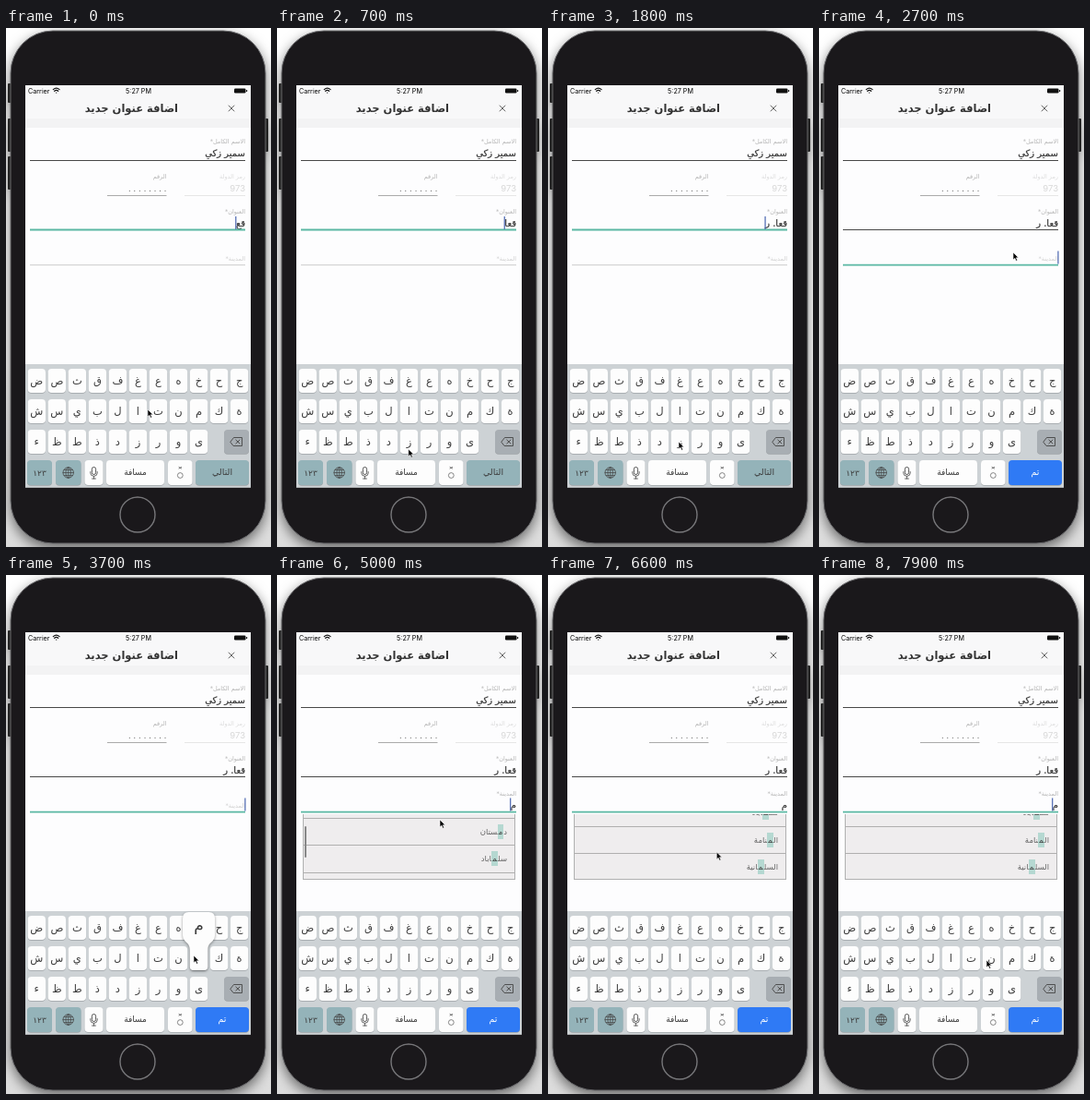
These frames come from a looping animation (288 by 562 pixels, 8000 ms). An HTML page:

```html
<!DOCTYPE html>
<html lang="ar">
<head>
<meta charset="utf-8">
<style>
html, body { margin: 0; width: 288px; height: 562px; overflow: hidden; background: linear-gradient(#fff 0 65%, #dcdcdc); }
svg, #list { position: absolute; }
svg { left: 0; top: 0; }
text, #list { font-family: "DejaVu Sans", sans-serif; }
text { white-space: pre; }
.latin { font-family: Inter, sans-serif; }
.value { font-size: 10px; fill: #333; stroke: #333; stroke-width: .2px; }
.label { font-size: 6.5px; fill: #b4b4b4; }
#list { left: 28px; top: 259px; width: 229px; height: 70px; overflow: hidden; border: 1px solid #b0b0b0; border-top: 0; background: #efedee; }
#rows { position: absolute; top: 4px; width: 100%; }
#rows div { box-sizing: border-box; height: 29.2px; padding-right: 8px; border-top: 1px solid #b0afaf; font-size: 8.5px; line-height: 28px; color: #666; direction: rtl; }
mark { background: #b5d8d1; color: #444; padding: 3px 1px; }
#bar { position: absolute; left: 1px; width: 2px; height: 34px; border-radius: 1px; background: #888; }
</style>
</head>
<body>
<svg id="phone" width="288" height="562"></svg>
<div id="list"><div id="rows"></div><div id="bar"></div></div>
<svg width="288" height="562">
  <path id="pointer" d="M0 0V8L1.9 6.3 3.2 9.2 4.6 8.6 3.3 5.8H5.8Z" fill="#000" stroke="#fff" stroke-width=".6"/>
</svg>
<script>
const $ = id => document.getElementById(id);
const rect = (x, y, w, h, r, fill, extra = '') =>
  `<rect x="${x}" y="${y}" width="${w}" height="${h}" rx="${r}" fill="${fill}" ${extra}/>`;
const line = (x1, x2, y, color, width, extra = '') =>
  `<path d="M${x1} ${y}H${x2}" stroke="${color}" stroke-width="${width}" ${extra}/>`;
const rtl = (x, y, str, extra = '') => `<text x="${x}" y="${y}" direction="rtl" ${extra}>${str}</text>`;
const mid = (x, y, size, str, extra = '') =>
  `<text x="${x}" y="${y}" font-size="${size}" text-anchor="middle" ${extra}>${str}</text>`;
const icon = (d, width = 1, color = '#444') =>
  `<path d="${d}" fill="none" stroke="${color}" stroke-width="${width}" stroke-linecap="round"/>`;
const key = (x, y, w, h = 26, fill = '#fdfdfd', id = '') =>
  rect(x, y + .8, w, h, 4, '#9da2a6') + rect(x, y, w, h, 4, fill, id && `id="${id}"`);

const TEAL = '#5ab8a3', DIM = '#94b3b9', BLUE = '#2f7af5', WHITE = '#fdfdfd', INK = '#3c3c3c', RULE = '#484848';
const LETTERS = ['ضصثقفغعهخحج', 'شسيبلاتنمكة', 'ءظطذدزروى'];
const keyX = col => 33.3 + 22.03 * col;
const keyY = row => 369 + 33 * row;

const body = `
  <g style="filter:drop-shadow(0 5px 7px #0008)">
    ${[[60, 21], [98, 36], [139, 36]].map(([y, h]) => rect(2, y, 5, h, 1, '#222')).join('')}
    ${rect(280, 98, 5, 36, 1, '#222')}
    ${rect(5, 3, 277, 555, 46, '#1a181b', 'stroke="#6a6a6d"')}
  </g>
  <circle cx="143" cy="527" r="19" fill="none" stroke="#77777a" stroke-width="1.4"/>
  ${rect(21, 62, 245, 435.5, 0, '#fdfdfe')}`;

const header = `
  ${rect(21, 62, 245, 37, 0, '#f8f8f9')}${rect(21, 98, 245, 10, 0, '#f3f3f4')}
  <text class="latin" x="24" y="70.5" font-size="7.2">Carrier</text>
  <text class="latin" x="144" y="70.5" font-size="7.2" text-anchor="middle">5:27 PM</text>
  ${icon('M51.3 66.6Q54.7 63.6 58.1 66.6M52.7 68.3Q54.7 66.6 56.7 68.3M54.7 70V70.1', 1.2, '#111')}
  ${rect(248, 65.5, 12.5, 5, 1.3, '#111')}${rect(261, 67, 1.2, 2, .5, '#111')}
  ${rtl(187, 90.5, 'اضافة عنوان جديد', 'font-size="11.5" font-weight="700" fill="#333"')}
  ${icon('M242 84L248 90M248 84L242 90', .8)}`;

const form = `
  ${rtl(260, 124.5, 'الاسم الكامل*', 'class="label"')}
  ${rtl(260, 139, 'سمير زكي', 'class="value"')}
  ${line(26, 260, 143.5, RULE, 1)}
  ${rtl(260, 162.5, 'رمز الدولة', 'class="label" style="fill:#dcdcdc"')}
  ${rtl(174.5, 162.5, 'الرقم', 'class="label"')}
  <text class="latin" x="260" y="177" font-size="9.5" fill="#d8d8d8" text-anchor="end">973</text>
  <text x="133" y="176.5" font-size="8" letter-spacing="3" fill="#555">........</text>
  ${line(194, 260, 181.5, '#e6e6e6', 1)}${line(110, 174.5, 181.5, '#aaa', 1)}
  ${rtl(260, 200.5, 'العنوان*', 'class="label"')}
  ${rtl(260, 214.5, '', 'class="value" id="address"')}
  ${line(26, 260, 218.5, RULE, 1, 'id="addressLine"')}
  ${rtl(260, 251.5, 'المدينة*', 'class="label" id="cityLabel"')}
  ${rtl(260, 252.5, '', 'class="value" id="city"')}
  ${line(26, 260, 256.7, '#ccc', 1, 'id="cityLine"')}
  ${rect(0, 0, 1.2, 14, 0, '#4a66b0', 'id="caret"')}`;

const letterKeys = LETTERS.map((row, r) => [...row].map((ch, c) =>
  key(keyX(c) - 9.7, keyY(r), 19.4) + mid(keyX(c), keyY(r) + 16.5, 11.5, ch, `fill="${INK}"`)).join('')).join('');

const keyboard = `
  ${rect(21, 364, 245, 133.5, 0, '#cdd2d5')}
  ${letterKeys}
  ${key(237, 435, 27, 26, '#a8aeb3')}
  ${icon('M244 448L247.5 443.5H256.5V452.5H247.5ZM249.8 446L254 450M254 446L249.8 450', .9)}
  ${key(23, 468, 27, 27, DIM)}${mid(36.5, 484.5, 9, '١٢٣', `fill="${INK}"`)}
  ${key(54, 468, 27.5, 27, DIM)}
  ${icon('M62 481.5H73.4M67.7 475.8V487.2M63.2 478.5H72.2M63.2 484.5H72.2', .7)}
  <g fill="none" stroke="#444" stroke-width=".8"><circle cx="67.7" cy="481.5" r="5.7"/><ellipse cx="67.7" cy="481.5" rx="2.7" ry="5.7"/></g>
  ${key(85.5, 468, 20, 27)}
  ${rect(93.4, 475.5, 4.2, 8, 2.1, 'none', 'stroke="#444" stroke-width=".9"')}
  ${icon('M91.8 480.5V482Q92 485.3 95.5 485.3T99.2 482V480.5M95.5 485.5V488M93.5 488H97.5', .8)}
  ${key(109, 468, 63, 27, WHITE, 'space')}${mid(140.5, 484, 9, 'مسافة', `fill="${INK}"`)}
  ${key(176, 468, 26.5, 27)}
  <circle cx="189.3" cy="484.5" r="2.9" fill="none" stroke="#555" stroke-width=".7"/>
  ${icon('M188 475.5L190.6 477M190.6 475.5L188 477', .7)}
  ${key(206, 468, 58, 27, DIM, 'next')}${mid(235, 484, 9.5, '', 'id="nextText"')}
  <g id="popup" style="filter:drop-shadow(0 1px 1.5px #0006)">
    <path d="M-11 -37H11Q17.5 -37 17.5 -30V-12C17.5 -4 9.7 -5 9.7 4V22Q9.7 26 5.7 26H-5.7Q-9.7 26 -9.7 22V4C-9.7 -5 -17.5 -4 -17.5 -12V-30Q-17.5 -37 -11 -37Z" fill="#fdfdfd"/>
    ${mid(0, -17, 17, '', `id="popupText" fill="${INK}"`)}
  </g>`;

$('phone').innerHTML = body + header + form + keyboard;
$('rows').innerHTML = ['المحرق', 'دمستان', 'سلماباد', 'المنامة', 'السلمانية']
  .map(city => `<div>${city.replace('م', '<mark>م</mark>')}</div>`).join('');

// Times in seconds
const POINTER = [
  [0, 154, 413], [.3, 145, 415], [.5, 145, 415], [.8, 142, 470], [1.3, 141, 470], [1.5, 72, 450],
  [1.65, 142, 448], [1.85, 142, 448], [2.35, 211, 243], [2.75, 211, 243], [3.5, 204, 412], [4.2, 204, 412],
  [4.6, 177, 296], [4.8, 177, 296], [5, 177, 265], [5.25, 178, 245], [5.4, 179, 245], [5.65, 182, 296],
  [5.8, 182, 296], [6.1, 182, 267], [6.5, 182, 267], [6.9, 190, 474], [7.35, 148, 418], [7.55, 140, 418],
  [7.85, 182, 417], [8, 182, 417]];
const SCROLL = [[4.8, 0], [5, 29], [5.3, 51], [5.8, 51], [6.2, 79], [8, 79]];
const ADDRESS = [[0, 'قع'], [.45, 'قعا'], [.9, 'قعا '], [1.25, 'قعا. '], [1.75, 'قعا. ر']];
const PRESSES = [[.3, .5, 1, 5], [1.65, 1.8, 2, 6], [3.6, 3.9, 1, 8]];
const FOCUS = 2.7, TYPED = 3.85, LIST = 4;

const within = (t, a, b) => t >= a && t < b;
const latest = (steps, t) => steps.findLast(([start]) => start <= t);

function tween(keys, t) {
  const i = keys.findIndex(k => k[0] > t);
  if (i < 1) return (i ? keys.at(-1) : keys[0]).slice(1);
  const a = keys[i - 1], b = keys[i], p = (t - a[0]) / (b[0] - a[0]), ease = p * p * (3 - 2 * p);
  return a.slice(1).map((v, n) => v + (b[n + 1] - v) * ease);
}

function setLine(id, focused, idle) {
  $(id).setAttribute('stroke', focused ? TEAL : idle);
  $(id).setAttribute('stroke-width', focused ? 1.8 : 1);
}

function draw(t) {
  const inCity = t >= FOCUS, typed = t >= TYPED;
  const [addressTime, address] = latest(ADDRESS, t);
  $('address').textContent = address;
  $('city').textContent = typed ? 'م' : '';
  setLine('addressLine', !inCity, RULE);
  setLine('cityLine', inCity, '#ccc');
  $('cityLabel').setAttribute('y', typed ? 238.5 : 251.5);
  $('cityLabel').style.fill = typed ? '#b4b4b4' : '#cfcfcf';

  const field = $(inCity ? 'city' : 'address');
  const width = field.textContent ? field.getComputedTextLength() : 0;
  const since = t - (typed ? TYPED : inCity ? FOCUS : addressTime);
  $('caret').setAttribute('x', 259.3 - width);
  $('caret').setAttribute('y', inCity ? 241.5 : 204);
  $('caret').setAttribute('opacity', since % 1 < .6 ? 1 : 0);

  $('space').setAttribute('fill', within(t, .8, .95) || within(t, 1.15, 1.3) ? DIM : WHITE);
  $('next').setAttribute('fill', inCity ? BLUE : DIM);
  $('nextText').textContent = inCity ? 'تم' : 'التالي';
  $('nextText').setAttribute('fill', inCity ? '#fff' : INK);

  const press = PRESSES.find(([a, b]) => within(t, a, b));
  $('popup').style.display = press ? '' : 'none';
  if (press) {
    const [, , row, col] = press;
    $('popup').setAttribute('transform', `translate(${keyX(col)} ${keyY(row)})`);
    $('popupText').textContent = LETTERS[row][col];
  }

  const [scroll] = tween(SCROLL, t);
  $('list').style.display = t >= LIST ? '' : 'none';
  $('rows').style.transform = `translateY(${-scroll}px)`;
  $('bar').style.top = scroll * .46 + 'px';
  $('bar').style.opacity = within(t, 4.8, 5.5) || within(t, 5.8, 6.4) ? 1 : 0;

  const [x, y] = tween(POINTER, t);
  $('pointer').setAttribute('transform', `translate(${x} ${y})`);
}

function loop() {
  draw(performance.now() / 1000 % 8);
  requestAnimationFrame(loop);
}
loop();
</script>
</body>
</html>
```
